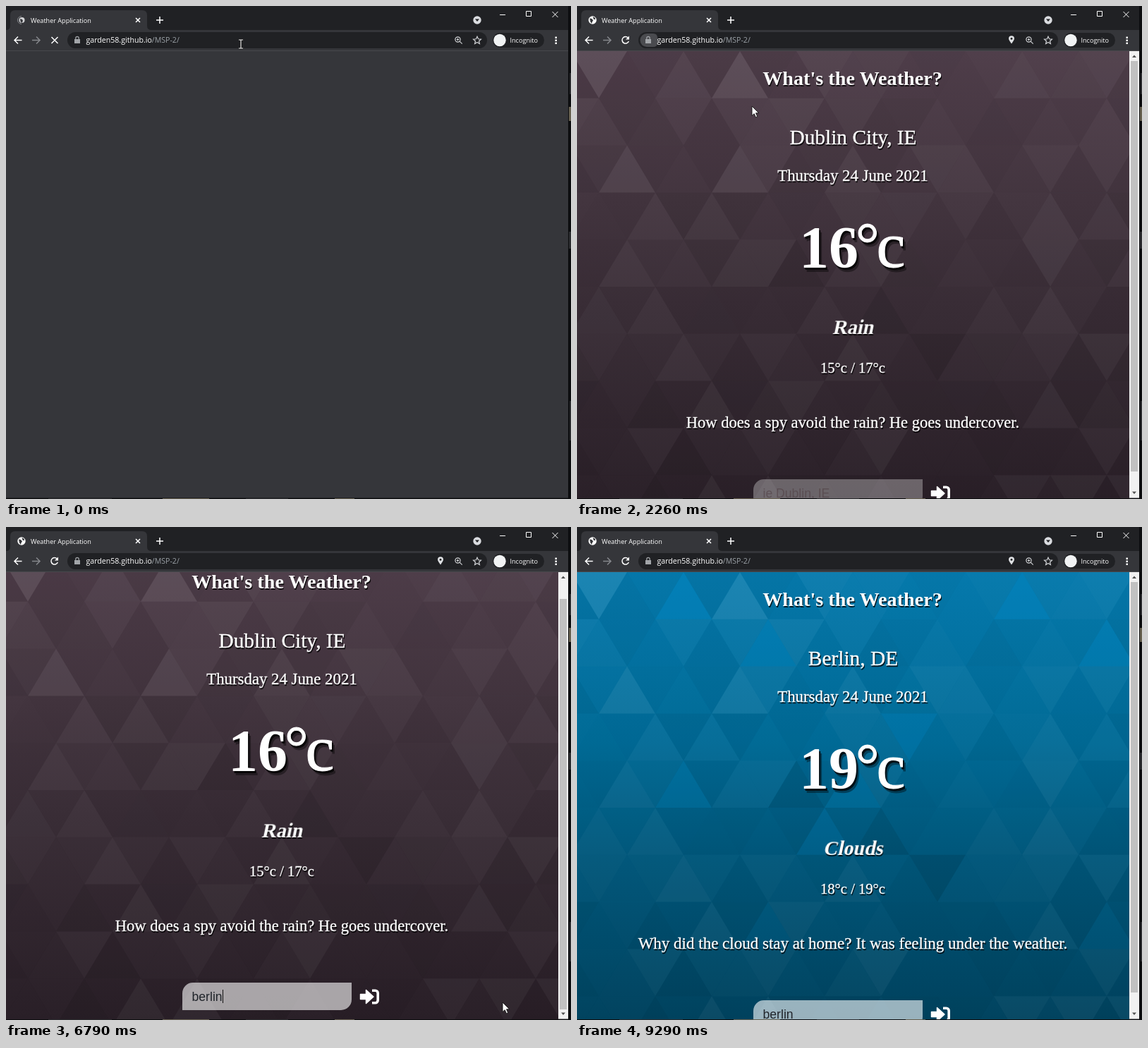
Write an HTML page that moves like this. It is 801x699 px and loops after 9.55 s.

```html
<!DOCTYPE html>
<html lang="en">
<head>
<meta charset="utf-8">
<title>Weather Application</title>
<style>
html, body { margin: 0; width: 100%; height: 100%; overflow: hidden; background: #0c0d0f; }
svg { display: block; }
.ui { font-family: "Open Sans", "Noto Sans", sans-serif; font-size: 9.1px; fill: #fff; }
.page { font-family: "Liberation Serif", "Noto Serif", serif; fill: #fff; text-anchor: middle; }
.page text { filter: drop-shadow(1.5px 2px .5px rgba(0,0,0,.8)); }
.head { font-size: 28.2px; font-weight: 700; }
.city { font-size: 29.4px; }
.body { font-size: 22.8px; }
.range { font-size: 20.6px; }
.city, .body, .range { stroke: #fff; stroke-width: .3; }
.page .temp { font-size: 84px; text-anchor: start; stroke: #fff;
  filter: drop-shadow(2px 3.5px 0 rgba(0,0,0,.65)) drop-shadow(2px 3.5px 0 rgba(0,0,0,.6)); }
.temp .num { font-weight: 700; stroke: none; }
.field text { font: 17.6px "Liberation Sans", Arial, sans-serif; text-anchor: start; filter: none; fill: #20242a; }
.field .hint { fill: rgba(70,52,56,.45); }
.field .faint { fill: rgba(90,60,56,.22); }
.line { fill: none; stroke: #fff; stroke-width: 1.5; }

[class*="a-"] { animation: 9550ms step-end infinite; }
.a-load { animation-name: load; }
.a-ready { animation-name: ready; }
.a-intro { animation-name: intro; }
.a-main { animation-name: main; }
.a-rain { animation-name: rain; }
.a-cloud { animation-name: cloud; }
.a-popup { animation-name: popup; }
.a-hover { animation-name: hover; }
.a-chip { animation-name: chip; }
.a-pin { animation-name: pin; }
.a-scroll { animation-name: scroll; }
.a-thumb { animation-name: thumb; }
.a-focus { animation-name: focus; }
.a-hint { animation-name: hint; }
.a-caret { animation-name: caret; }
.a-arrow { animation-name: arrow; }
.a-beam { animation-name: beam; }
.a-k1 { animation-name: k1; }
.a-k2 { animation-name: k2; }
.a-k3 { animation-name: k3; }
.a-k4 { animation-name: k4; }
.a-k5 { animation-name: k5; }

@keyframes load { 0% { opacity: 1 } 2.61%, 100% { opacity: 0 } }
@keyframes ready { 0% { opacity: 0 } 2.61%, 100% { opacity: 1 } }
@keyframes intro { 0% { opacity: 0 } 2.61% { opacity: 1 } 23.66%, 100% { opacity: 0 } }
@keyframes main { 0% { opacity: 0 } 23.66%, 100% { opacity: 1 } }
@keyframes rain { 0% { opacity: 1 } 73.71%, 100% { opacity: 0 } }
@keyframes cloud { 0% { opacity: 0 } 73.71%, 100% { opacity: 1 } }
@keyframes popup {
  0% { opacity: 0; transform: none }
  2.61% { opacity: .76; transform: none }
  5.23% { opacity: 1; transform: none }
  21.04% { opacity: .24; transform: translate(4px, 2.5px) }
  23.66%, 100% { opacity: 0; transform: none }
}
@keyframes hover { 0% { opacity: 0 } 15.7% { opacity: .08 } 18.32% { opacity: .16 } 21.04%, 100% { opacity: 0 } }
@keyframes chip {
  0% { opacity: 0; fill: #3a5461 }
  2.61% { opacity: 1; fill: #3a5461 }
  5.23% { opacity: 1; fill: #4a4b4f }
  26.28%, 100% { opacity: 0; fill: #4a4b4f }
}
@keyframes pin { 0% { opacity: 0 } 21.04%, 100% { opacity: 1 } }
@keyframes scroll {
  0% { transform: none }
  34.24% { transform: translateY(-14px) }
  36.85% { transform: translateY(-25px) }
  81.57% { transform: translateY(-12px) }
  84.29%, 100% { transform: none }
}
@keyframes thumb {
  0% { transform: none }
  34.24% { transform: translateY(13px) }
  36.85% { transform: translateY(24px) }
  81.57% { transform: translateY(11px) }
  84.29%, 100% { transform: none }
}
@keyframes focus { 0% { fill-opacity: .31 } 44.81%, 100% { fill-opacity: .6 } }
@keyframes hint { 0% { opacity: 1 } 60.62%, 100% { opacity: 0 } }
@keyframes k1 { 0% { fill-opacity: 0 } 60.62%, 100% { fill-opacity: 1 } }
@keyframes k2 { 0% { fill-opacity: 0 } 63.24%, 100% { fill-opacity: 1 } }
@keyframes k3 { 0% { fill-opacity: 0 } 65.86%, 100% { fill-opacity: 1 } }
@keyframes k4 { 0% { fill-opacity: 0 } 68.48%, 100% { fill-opacity: 1 } }
@keyframes k5 { 0% { fill-opacity: 0 } 71.09%, 100% { fill-opacity: 1 } }
@keyframes caret {
  0% { opacity: 0; transform: none }
  44.81% { opacity: 1; transform: none }
  50.05% { opacity: 0; transform: none }
  55.39% { opacity: 1; transform: none }
  60.62% { opacity: 1; transform: translateX(9.8px) }
  63.24% { opacity: 1; transform: translateX(19.6px) }
  65.86% { opacity: 1; transform: translateX(25.4px) }
  68.48% { opacity: 1; transform: translateX(29.4px) }
  71.09% { opacity: 1; transform: translateX(43px) }
  78.95% { opacity: 0; transform: translateX(43px) }
  84.29% { opacity: 1; transform: translateX(43px) }
  86.8%, 100% { opacity: 0; transform: translateX(43px) }
}
@keyframes beam {
  0% { opacity: 1; transform: translate(333px, 54px) }
  5.23% { opacity: 0; transform: translate(333px, 54px) }
  42.09% { opacity: 1; transform: translate(345px, 666px) }
  47.43% { opacity: 1; transform: translate(372px, 667px) }
  50.05%, 100% { opacity: 0; transform: translate(333px, 54px) }
}
@keyframes arrow {
  0% { opacity: 0; transform: translate(333px, 54px) }
  5.23% { opacity: 1; transform: translate(322px, 78px) }
  7.85% { opacity: 1; transform: translate(296px, 112px) }
  10.47% { opacity: 1; transform: translate(262px, 136px) }
  13.08% { opacity: 1; transform: translate(248px, 142px) }
  26.28% { opacity: 1; transform: translate(281px, 177px) }
  28.79% { opacity: 1; transform: translate(446px, 383px) }
  31.72% { opacity: 1; transform: translate(498px, 540px) }
  34.24% { opacity: 1; transform: translate(510px, 602px) }
  39.47% { opacity: 1; transform: translate(430px, 640px) }
  42.09% { opacity: 0; transform: translate(430px, 640px) }
  50.05% { opacity: 1; transform: translate(540px, 669px) }
  52.77% { opacity: 1; transform: translate(650px, 672px) }
  55.39% { opacity: 1; transform: translate(704px, 674px) }
  86.8% { opacity: 1; transform: translate(774px, 683px) }
  89.42% { opacity: 1; transform: translate(560px, 430px) }
  92.04% { opacity: 1; transform: translate(290px, 170px) }
  94.65% { opacity: 1; transform: translate(98px, 26px) }
  97.27%, 100% { opacity: 0; transform: translate(98px, 26px) }
}
</style>
</head>
<body>
<svg width="801" height="699" viewBox="0 0 801 699">
  <defs>
    <linearGradient id="blue" x2="0" y2="1">
      <stop stop-color="#0579ac"/><stop offset=".36" stop-color="#006a96"/>
      <stop offset=".6" stop-color="#00577b"/><stop offset="1" stop-color="#00405b"/>
    </linearGradient>
    <linearGradient id="plum" x2="0" y2="1">
      <stop stop-color="#4e3d49"/><stop offset=".32" stop-color="#42343e"/>
      <stop offset=".56" stop-color="#382c35"/><stop offset="1" stop-color="#281e26"/>
    </linearGradient>
    <clipPath id="view"><path d="M0 64H797V697.5H0z"/></clipPath>
    <clipPath id="pane"><path d="M0 64H783V697.5H0z"/></clipPath>
    <g id="enter" fill="#fff">
      <path d="M1.5-3.5H9.5V-9.5L20 0 9.5 9.5V3.5H1.5z" stroke="#fff" stroke-width="1.5" stroke-linejoin="round"/>
      <path class="line" style="stroke-width:3.6" d="M18-8.7H22.5A3.7 3.7 0 0 1 26.2-5V5A3.7 3.7 0 0 1 22.5 8.7H18"/>
    </g>
    <path id="box" d="M15 0H240V24A15 15 0 0 1 225 39H0V15A15 15 0 0 1 15 0z"/>
    <path id="drop" fill-rule="evenodd" d="M0 5.5C-2.6 2-4-.2-4-1.7A4 4 0 0 1 4-1.7C4-.2 2.6 2 0 5.5zM0-3.2A1.5 1.5 0 1 0 0-.2 1.5 1.5 0 1 0 0-3.2z"/>
  </defs>

  <!-- desktop edge -->
  <path fill="#0c0d0f" d="M0 0H801V699H0z"/>
  <path fill="#2b2c2f" d="M799 95h2v30h-2zM798 320h3v24h-3zM799 560h2v56h-2zM60 698h90v1H60zM340 698h60v1h-60z"/>
  <path fill="#66604f" d="M798 143h3v20h-3zM222 698h66v1h-66zM466 698h28v1h-28z"/>

  <!-- browser window -->
  <g class="ui">
    <path fill="#202124" d="M0 0H797V34H0z"/>
    <path fill="#35363a" d="M0 34H797V697.5H0z"/>
    <path fill="#35363a" d="M0 34Q6 34 6 28V13Q6 6 13 6H193Q200 6 200 13V28Q200 34 206 34z"/>
    <path fill="#47484c" d="M0 63H797V64H0z"/>
    <g class="a-ready">
      <circle cx="22" cy="20" r="5.7"/>
      <path fill="#35363a" d="M18 17.5L21 18 23 20.5 21.5 22.5 21 25 19 22.5zM22.5 15L26 17 25.5 19.5 23.5 18.5z"/>
    </g>
    <g class="a-load">
      <circle cx="22.5" cy="20" r="4" fill="#d5d6d8"/>
      <path fill="#35363a" d="M20 18l3 1 1 2-1.5 3-2-2z"/>
      <path class="line" style="stroke:#85878b;stroke-width:1" d="M22 14.5A5.5 5.5 0 0 0 22 25.5"/>
    </g>
    <text x="35" y="23.5">Weather Application</text>
    <path class="line" d="M184 17l6 6m0-6l-6 6M213 20h10m-5-5v10"/>
    <circle cx="668" cy="20" r="5.7" fill="#dadce0"/>
    <path fill="#202124" d="M665 18.5h6l-3 3.5z"/>
    <path class="line" style="stroke-width:1" d="M700 12.5h8M737.5 7.5h7v7h-7zM774.5 8l8 8m0-8l-8 8"/>
    <path class="line" d="M22.5 48.5H12.5M17 43.5l-5 5 5 5"/>
    <path class="line" style="stroke:#85878b" d="M37 48.5H47.5M43 43.5l5 5-5 5"/>
    <path class="line a-load" d="M64.5 44l9 9m0-9l-9 9"/>
    <g class="a-ready">
      <path class="line" d="M72.3 45A4.8 4.8 0 1 0 73.3 50"/>
      <path d="M74 42.5V47.5H69z"/>
    </g>
    <rect x="87" y="37" width="595" height="23" rx="11.5" fill="#202124"/>
    <path class="a-chip" d="M99 39H108Q114 39 114 45V52Q114 58 108 58H99A9.5 9.5 0 0 1 99 39z"/>
    <g fill="#a2a5a9">
      <path d="M97 47h8v6h-8z"/>
      <path class="line" style="stroke:#a2a5a9;stroke-width:1.2" d="M98.8 47V45.5A2.2 2.2 0 0 1 103.2 45.5V47"/>
    </g>
    <text x="113.5" y="52" font-size="10.6">garden58.github.io<tspan fill="#9aa0a6">/MSP-2/</tspan></text>
    <use href="#drop" class="a-pin" x="616" y="48" fill="#dfe1e4"/>
    <g class="line" style="stroke:#d0d2d5;stroke-width:1.2">
      <circle cx="640.5" cy="47.5" r="3.6"/>
      <path d="M643.2 50.2l3.5 3.5M638.7 47.5h3.6m-1.8-1.8v3.6"/>
      <path d="M668 43.3l1.6 3.5 3.8.4-2.9 2.5.9 3.8-3.4-2-3.4 2 .9-3.8-2.9-2.5 3.8-.4z"/>
    </g>
    <rect x="690" y="38" width="73" height="21" rx="10.5" fill="#202124"/>
    <circle cx="700" cy="48.5" r="8.7" fill="#f1f3f4"/>
    <text x="714.5" y="52">Incognito</text>
    <path d="M778.5 43.5h2.4v2.4h-2.4zm0 4h2.4v2.4h-2.4zm0 4h2.4v2.4h-2.4z"/>
  </g>

  <!-- landing page -->
  <g class="page a-intro" clip-path="url(#view)">
    <g data-paint="blue" data-left="-2"></g>
    <text class="head" x="397.5" y="112">What's the Weather?</text>
    <g class="head" style="font-size:28.8px">
      <text transform="translate(397.5 209) skewX(-12)">Without geolocation permission please search for your location</text>
      <text transform="translate(397.5 263) skewX(-12)">below</text>
    </g>
    <g class="field" transform="translate(257 646)">
      <use href="#box" fill="#fff" fill-opacity=".31"/>
      <text class="faint" x="13.5" y="26">ie Dublin, IE</text>
      <use href="#enter" x="251" y="20"/>
    </g>
  </g>

  <!-- forecast page -->
  <g class="a-main">
    <g clip-path="url(#pane)">
      <g class="page a-scroll">
        <g class="a-rain">
          <g data-paint="plum" data-left="-9"></g>
          <text class="city" x="391.5" y="196">Dublin City, IE</text>
          <text class="temp" y="371"><tspan class="num" x="315">16</tspan><tspan x="395" dy="-5">°</tspan><tspan x="424.5" dy="4" font-size="92">c</tspan></text>
          <text class="head" transform="translate(391 465) skewX(-12)">Rain</text>
          <text class="range" x="391" y="520">15°c / 17°c</text>
          <text class="body" style="font-size:22.5px" x="391" y="598">How does a spy avoid the rain? He goes undercover.</text>
        </g>
        <g class="a-cloud">
          <g data-paint="blue" data-left="-9"></g>
          <text class="city" x="391.5" y="196">Berlin, DE</text>
          <text class="temp" y="371"><tspan class="num" x="315">19</tspan><tspan x="395" dy="-5">°</tspan><tspan x="424.5" dy="4" font-size="92">c</tspan></text>
          <text class="head" transform="translate(391 465) skewX(-12)">Clouds</text>
          <text class="range" x="391" y="520">18°c / 19°c</text>
          <text class="body" style="font-size:23px" x="391" y="598">Why did the cloud stay at home? It was feeling under the weather.</text>
        </g>
        <text class="head" x="390.5" y="112">What's the Weather?</text>
        <text class="body" x="391" y="248">Thursday 24 June 2021</text>
        <g class="field" transform="translate(250 671)">
          <use href="#box" class="a-focus" fill="#fff"/>
          <text class="hint a-hint" x="13.5" y="26">ie Dublin, IE</text>
          <text x="13.5" y="26"><tspan class="a-k1">b</tspan><tspan class="a-k2">e</tspan><tspan class="a-k3">r</tspan><tspan class="a-k4">l</tspan><tspan class="a-k5">in</tspan></text>
          <path class="a-caret" fill="#111" d="M14 10h1v19h-1z"/>
          <use href="#enter" x="251" y="20"/>
        </g>
      </g>
    </g>
    <path fill="#f1f1f1" d="M783 64H797V697.5H783z"/>
    <path class="a-thumb" fill="#c1c1c1" d="M785 78H795V660H785z"/>
    <path fill="#505050" d="M787 73h6l-3-3.5zM787 688.5h6l-3 3.5z"/>
  </g>

  <!-- permission prompt -->
  <g class="ui a-popup">
    <rect x="89" y="63" width="254.5" height="103" rx="3" fill="#292a2d" style="filter:drop-shadow(0 1px 2px rgba(0,0,0,.5))"/>
    <text x="101" y="88" font-size="11.3" fill="#e8eaed">garden58.github.io wants to</text>
    <use href="#drop" x="109" y="105" fill="#bdc1c6"/>
    <text x="125" y="109.5" fill="#e8eaed">Know your location</text>
    <path class="line" style="stroke:#bdc1c6" d="M328.5 70.5l6 6m0-6l-6 6"/>
    <g fill="none" stroke="#4b4d51">
      <rect x="223.5" y="127.5" width="50" height="25" rx="2"/>
      <rect x="281.5" y="127.5" width="50" height="25" rx="2"/>
    </g>
    <rect class="a-hover" x="223.5" y="127.5" width="50" height="25" rx="2" fill="#8ab4f8"/>
    <g fill="#8ab4f8" font-weight="600" text-anchor="middle">
      <text x="248" y="143.5">Allow</text>
      <text x="306" y="143.5">Block</text>
    </g>
  </g>

  <!-- pointers -->
  <path class="a-arrow" d="M0 0V13.5L3.2 10.7 5.4 15.7 7.7 14.7 5.5 9.8H9.8z" fill="#fff" stroke="#111" stroke-width=".9"/>
  <g class="a-beam">
    <path class="line" style="stroke:#111;stroke-width:2.6" d="M-3-6h6M0-6V6M-3 6h6"/>
    <path class="line" style="stroke-width:1.1" d="M-3-6h6M0-6V6M-3 6h6"/>
  </g>
</svg>
<script>
const NS = "http://www.w3.org/2000/svg";
const TOP = 64, ROW = 66.8, HALF = 40;
const vivid = new Set(["0,4", "0,16", "1,7", "1,19", "3,12", "4,4", "4,10", "5,9", "7,7", "7,19"]);
const pale = new Set(["0,1", "0,6", "2,2", "2,6", "6,10"]);
const dark = new Set(["4,8", "5,11", "6,13"]);

function add(parent, name, attrs) {
  const el = document.createElementNS(NS, name);
  for (const key in attrs) el.setAttribute(key, attrs[key]);
  parent.append(el);
}

function noise(r, j) {
  const v = Math.sin(r * 12.9898 + j * 78.233) * 43758.5453;
  return v - Math.floor(v);
}

// Colour and strength of one triangle; highlights weaken down the page.
function shade(r, j, paint) {
  const id = r + "," + j;
  const fade = 1 - r / 10;
  if (vivid.has(id)) return paint === "blue" ? ["#008ccc", .32 * fade] : ["#fff", .035 * fade];
  if (pale.has(id)) return ["#fff", .085 * fade];
  if (dark.has(id)) return ["#000", .1];
  const n = noise(r, j) - .5;
  return [n > 0 ? "#fff" : "#000", Math.abs(n) * .09];
}

// Rows of alternating triangles over a vertical gradient.
function pattern(group) {
  const { paint, left } = group.dataset;
  add(group, "rect", { x: 0, y: TOP, width: 797, height: 660, fill: `url(#${paint})` });
  for (let r = 0; r < 10; r++) {
    for (let j = 0; j <= 21; j++) {
      const x = +left + j * HALF, y = TOP + r * ROW;
      const up = (r + j) % 2 === 0;
      const base = up ? y + ROW : y, tip = up ? y : y + ROW;
      const [fill, alpha] = shade(r, j, paint);
      add(group, "path", {
        d: `M${x - HALF} ${base}H${x + HALF}L${x} ${tip}z`,
        fill, "fill-opacity": alpha.toFixed(3)
      });
    }
  }
}

document.querySelectorAll("[data-paint]").forEach(pattern);
</script>
</body>
</html>
```
